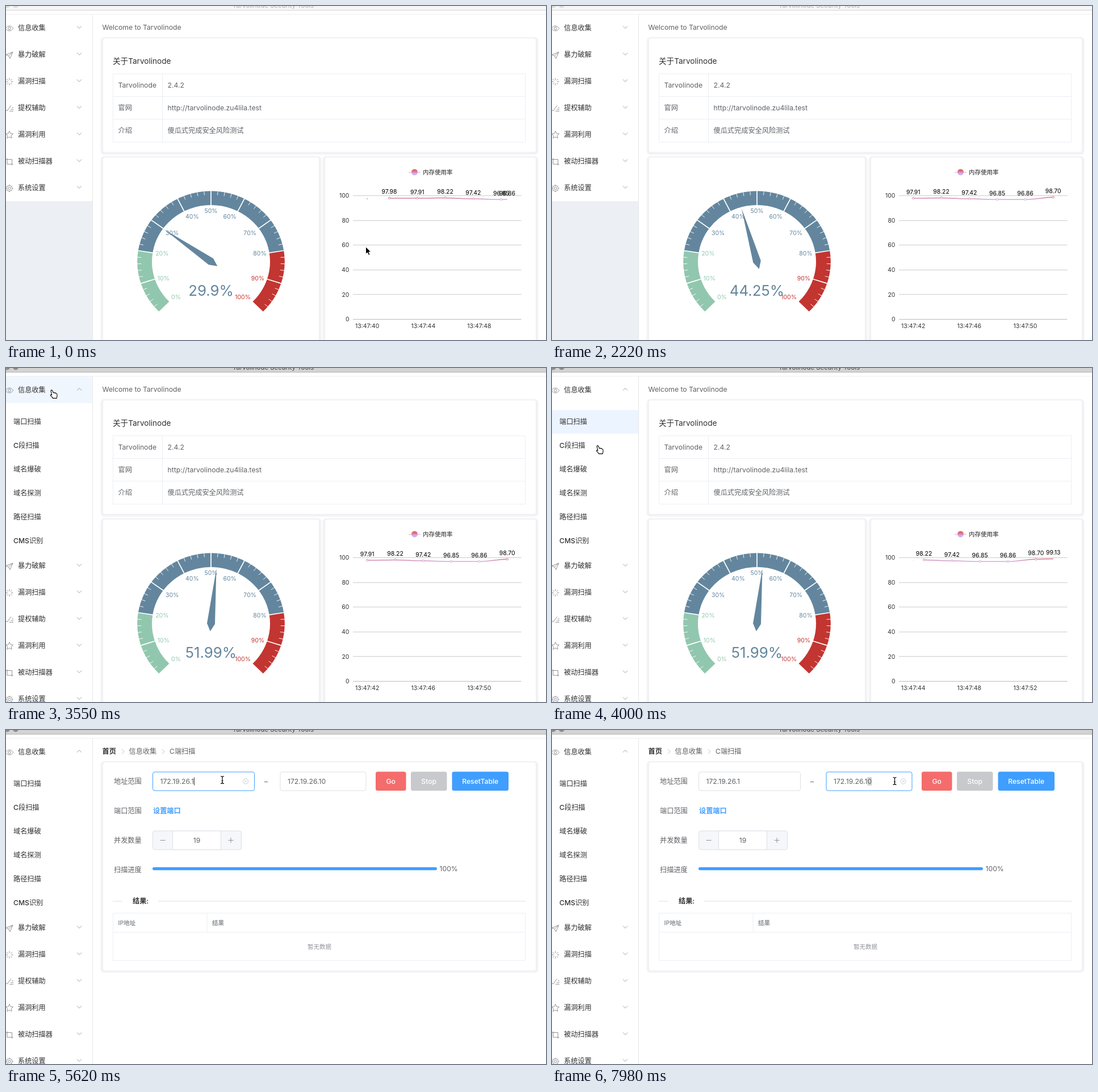
Animation, 951 px wide and 589 px high, one loop 8 s. Source, as an HTML page:

```html
<!DOCTYPE html>
<html lang="zh">
<head>
<meta charset="utf-8">
<style>
  html, body { margin: 0; width: 100%; height: 100%; overflow: hidden; background: #fff; }
  svg { display: block; width: 951px; height: 589px; }
  text { font-family: Inter, "Noto Sans CJK SC", "Noto Sans CJK", sans-serif; white-space: pre; }
</style>
</head>
<body>
<svg id="stage" viewBox="0 0 951 589" xmlns="http://www.w3.org/2000/svg"></svg>
<script>
const LOOP = 8000;
const BODY = 12.2, SMALL = 10.5;
const BLUE = '#63869e', GREEN = '#91c7ae', RED = '#c23531';
const INK = '#303133', GREY = '#606266', MUTED = '#909399', RULE = '#ebeef5';

const clamp = v => Math.max(0, Math.min(1, v));
const cubicOut = v => 1 - (1 - clamp(v)) ** 3;
const smooth = v => { v = clamp(v); return v * v * (3 - 2 * v); };
const mix = (a, b, p) => a + (b - a) * p;
const $ = id => document.getElementById(id);
const set = (id, attrs) => { for (const k in attrs) $(id).setAttribute(k, attrs[k]); };
const show = (id, on) => $(id).setAttribute('display', on ? 'inline' : 'none');

// Markup helpers; text is placed by its vertical centre.
const text = (x, cy, str, size = BODY, fill = GREY, extra = '') =>
  `<text x="${x}" y="${cy + size * .36}" font-size="${size}" fill="${fill}" ${extra}>${str}</text>`;
const rect = (x, y, w, h, fill, extra = '') =>
  `<rect x="${x}" y="${y}" width="${w}" height="${h}" fill="${fill}" ${extra}/>`;
const path = (d, stroke = RULE, w = 1, extra = '') =>
  `<path d="${d}" fill="none" stroke="${stroke}" stroke-width="${w}" ${extra}/>`;
const circle = (x, y, r, fill, extra = '') => `<circle cx="${x}" cy="${y}" r="${r}" fill="${fill}" ${extra}/>`;
const mid = 'text-anchor="middle"', end = 'text-anchor="end"', bold = 'font-weight="600"';

const shadow = (x, y, w, h) => rect(x - 3.5, y - 2, w + 7, h + 6, '#f3f3f3', 'rx="6"');
const card = (x, y, w, h) => rect(x, y, w, h, '#fff', `rx="3.5" stroke="${RULE}"`);

// ---------- sidebar ----------
const MENU = ['信息收集', '暴力破解', '漏洞扫描', '提权辅助', '漏洞利用', '被动扫描器', '系统设置'];
const SUBMENU = ['端口扫描', 'C段扫描', '域名爆破', '域名探测', '路径扫描', 'CMS识别'];
const ITEM = 47, SUB = 41.9, OPENED = 263;

const spokes = (n, r0, r1) => Array.from({ length: n }, (_, i) => {
  const a = i * 2 * Math.PI / n, c = Math.cos(a), s = Math.sin(a);
  return `M${c * r0} ${s * r0}L${c * r1} ${s * r1}`;
}).join('');
const star = 'M' + Array.from({ length: 10 }, (_, i) => {
  const a = i * Math.PI / 5 - Math.PI / 2, r = i % 2 ? 3.3 : 7;
  return `${r * Math.cos(a)} ${r * Math.sin(a)}`;
}).join('L') + 'Z';
const ring = r => `M${-r} 0a${r} ${r} 0 1 0 ${2 * r} 0a${r} ${r} 0 1 0 ${-2 * r} 0`;
const ICONS = [
  'M-7 0Q0-9 7 0Q0 9-7 0Z' + ring(2.3),
  'M6-5.5L-6-.5L-1.5 1.5L1 6ZL-1.5 1.5',
  spokes(8, 3, 6.5),
  'M-7 1.5L-4 4.5L3-5M0 4.8H7M2.5 1.8H7M4.5-1.2H7',
  star,
  'M-4-6V4.5H6.5M-7-4H4.5V6.5',
  ring(2.3) + ring(5) + spokes(8, 5, 6.7)
];

function menuItem(i) {
  const cy = 38.5 + i * ITEM;
  return rect(0, cy - 23.5, 151.5, ITEM, '#f0f6fe', `id="m${i}" opacity="0"`) +
    path(ICONS[i], MUTED, 1, `transform="translate(6 ${cy + 1})"`) +
    text(21, cy, MENU[i], BODY, INK, 'font-weight="500"') +
    path('M-4-2L0 2L4-2', MUTED, .9, `id="chev${i}" transform="translate(129 ${cy - 1})"`);
}

const sidebar = rect(0, 14, 152, 575, '#ecf0f5') +
  rect(0, 14, 152, 49, '#fff') + menuItem(0) +
  '<g id="submenu">' + rect(0, 62, 152, OPENED, '#fff') +
  SUBMENU.map((name, i) => {
    const cy = 95 + i * SUB;
    return rect(0, cy - 21, 152, SUB, '#ecf5ff', `id="s${i}" opacity="0"`) +
      text(13, cy, name, BODY, INK, 'font-weight="500"');
  }).join('') + '</g><g id="rest">' + rect(0, 62, 152, 282, '#fff') +
  MENU.map((_, i) => i ? menuItem(i) : '').join('') + '</g>' +
  path('M152.5 14V589', '#e6e6e6');

const HOVERS = [['m2', 2800, 2980], ['m0', 3000, 3750], ['s0', 3830, 4010], ['s1', 4020, 4450]];

// ---------- gauge ----------
const CX = 361, CY = 450.8, R = 129.8, FLAT = .959, BAND = 25.8;
const angleOf = v => (225 - v * 2.7) * Math.PI / 180;
const polar = (v, r) => {
  const a = angleOf(v);
  return [CX + r * Math.cos(a), CY - r * FLAT * Math.sin(a)];
};
const spoke = (v, r0, r1) => `M${polar(v, r0)}L${polar(v, r1)}`;

function band(from, to, fill) {
  const large = (to - from) * 2.7 > 180 ? 1 : 0, r = R - BAND;
  return `<path fill="${fill}" d="M${polar(from, R)}A${R} ${R * FLAT} 0 ${large} 1 ${polar(to, R)}` +
    `L${polar(to, r)}A${r} ${r * FLAT} 0 ${large} 0 ${polar(from, r)}Z"/>`;
}

function gaugeMarks() {
  let out = '';
  for (let v = 0; v <= 100; v += 2) {
    const major = v % 10 === 0;
    if (v > 0 && v < 100) out += path(spoke(v, R + .5, R - (major ? BAND + .5 : 7)), '#fff', major ? 1.75 : .9);
    if (!major) continue;
    const [x, y] = polar(v, 99), c = Math.cos(angleOf(v)), s = Math.sin(angleOf(v));
    const anchor = c < -.4 ? 'start' : c > .4 ? 'end' : 'middle';
    const dy = s > .4 ? 5 : s < -.4 ? -5 : 0;
    const fill = v <= 20 ? GREEN : v <= 80 ? BLUE : RED;
    out += text(x, y + dy, v + '%', SMALL, fill, `text-anchor="${anchor}"`);
  }
  return out;
}

const gauge = band(0, 20, GREEN) + band(20, 80, BLUE) + band(80, 100, RED) + gaugeMarks() +
  `<path id="needle" fill="${BLUE}"/>` + text(CX, 501.5, '', 25.8, BLUE, `id="reading" ${mid}`);

const READINGS = [[-2000, 29.9], [926, 44.25], [2926, 51.99]];

function drawGauge(t) {
  let k = 0;
  while (k < 2 && t >= READINGS[k + 1][0]) k++;
  const [start, value] = READINGS[k];
  const v = k ? mix(READINGS[k - 1][1], value, cubicOut((t - start) / 300)) : value;
  const a = angleOf(v), c = Math.cos(a), s = Math.sin(a), w = 7;
  const at = (along, side) => [CX + along * c + side * s, CY - FLAT * (along * s - side * c)];
  set('needle', { d: `M${at(-14, 0)}L${at(0, w)}L${at(101.5, 0)}L${at(0, -w)}Z` });
  $('reading').textContent = value + '%';
}

// ---------- memory chart ----------
const SERIES = [97.5, 97.98, 97.91, 98.22, 97.42, 96.85, 96.86, 98.70, 99.13];
const SHIFTS = [-22, 1960, 3919];
const slotX = i => 636.2 + i * 49.3;
const valueY = v => 552.5 - v * 2.18;

const chart = [0, 20, 40, 60, 80, 100].map(v =>
  path(`M611 ${Math.floor(valueY(v)) + .5}H907.5`, v ? '#ccc' : '#bbb') +
  text(604.5, valueY(v), v, SMALL, '#333', end)).join('') +
  [0, 1, 2].map(i => text(slotX(i * 2), 564, '', SMALL, '#333', `id="time${i}" ${mid}`)).join('') +
  path('M709 293.5H730', '#e7c6d6', 1.5) + circle(719.5, 293, 5.5, 'url(#legend)') +
  text(734, 293.5, '内存使用率', SMALL, '#222') +
  '<path id="line" fill="none" stroke="url(#trace)" stroke-width="1.5"/><g id="marks"></g>';

function drawChart(t) {
  let k = 0;
  while (k < 2 && t >= SHIFTS[k + 1]) k++;
  const p = cubicOut((t - SHIFTS[k]) / 300);
  const pts = SERIES.slice(k + 1, k + 7).map((v, i) =>
    ({ v, x: i < 5 ? mix(slotX(i + 1), slotX(i), p) : slotX(5), y: valueY(v) }));
  const ys = pts.map(q => q.y);
  set('trace', { y1: Math.min(...ys) - .5, y2: Math.max(...ys) + .5 });
  set('line', {
    d: pts.map((q, i) => {
      if (!i) return `M${q.x} ${q.y}`;
      const b = pts[i - 1], m = (q.x - b.x) * .35;
      return `C${b.x + m} ${b.y} ${q.x - m} ${q.y} ${q.x} ${q.y}`;
    }).join('')
  });
  const dot = (x, y, scale) => circle(x, y, 1.7 * scale, '#fff', 'stroke="url(#trace)" stroke-width="1"');
  const newest = clamp(p * 3 - 2);
  $('marks').innerHTML =
    (p < 1 ? circle(slotX(0), valueY(SERIES[k]), 1.7 * (1 - p), '#dcc8da') : '') +
    pts.map((q, i) => (i < 5 || newest > 0 ? dot(q.x, q.y, i < 5 ? 1 : newest) : '') +
      text(q.x, q.y - 11.2, q.v.toFixed(2), SMALL, '#000', mid)).join('');
  for (let i = 0; i < 3; i++) $('time' + i).textContent = '13:47:' + (40 + 2 * k + 4 * i);
}

// ---------- pages ----------
const dashboard = text(169.5, 38, 'Welcome to Tarvolinode') +
  shadow(170, 57, 764, 201) + shadow(170, 267, 382, 340) + shadow(561, 267, 373, 340) +
  card(170.5, 56.5, 763, 201.5) + card(170.5, 266.5, 381, 340) + card(561.5, 266.5, 372, 340) +
  text(188, 97, '关于Tarvolinode', 13.6, INK) +
  path('M188.5 119.5H914.5V240H188.5ZM188.5 159.5H914.5M188.5 199.5H914.5M275.5 119.5V240') +
  [['Tarvolinode', '2.4.2'], ['官网', 'http://tarvolinode.zu4lila.test'], ['介绍', '傻瓜式完成安全风险测试']]
    .map(([key, val], i) => text(197.5, 139.5 + 40 * i, key) + text(284.5, 139.5 + 40 * i, val)).join('') +
  gauge + chart;

const field = (id, x, w, value) =>
  rect(x, 74, w, 33, '#fff', `id="${id}" rx="3.5" stroke="#dcdfe6"`) +
  rect(0, 83, 8, 15, '#d4d4d4', `id="${id}Sel" display="none"`) +
  text(x + 13, 90.5, value, BODY, GREY, `id="${id}Text"`) +
  `<g id="${id}Clear">` + path(ring(4.6) + 'M-1.7-1.7L1.7 1.7M1.7-1.7L-1.7 1.7', '#c0c4cc', .9,
    `transform="translate(${x + w - 15.5} 90.5)"`) + '</g>';
const button = (x, w, label, fill) => rect(x, 73.5, w, 33.5, fill, 'rx="3.5"') +
  text(x + w / 2, 90.5, label, BODY, '#fff', `${mid} font-weight="500"`);
const crumb = x => path(`M${x - 2} 34L${x + 2} 38L${x - 2} 42`, '#c0c4cc');

const scan = text(169.5, 38, '首页', BODY, INK, 'font-weight="700"') + crumb(206) +
  text(216.5, 38, '信息收集') + crumb(277) + text(288, 38, 'C端扫描') +
  shadow(170, 57, 764, 367) + card(170.5, 56.5, 763, 368) +
  ['地址范围', '端口范围', '并发数量', '扫描进度'].map((s, i) => text(190, 90.5 + 52 * i, s)).join('') +
  field('from', 258.5, 179, '172.19.26.1') + text(458, 90.5, '–', BODY, GREY, mid) +
  field('to', 483, 151, '172.19.26.10') +
  path('M0 83.5V97.5', '#333', 1, 'id="caret"') +
  button(651, 53.5, 'Go', '#f56c6c') + button(713, 63.5, 'Stop', '#c8c9cc') +
  button(785.5, 99.5, 'ResetTable', '#409eff') +
  text(259, 142.5, '设置端口', BODY, '#409eff', bold) +
  rect(258.5, 178, 156, 33, '#f5f7fa', 'rx="3.5" stroke="#dcdfe6"') +
  rect(293.5, 178, 85, 33, '#fff', 'stroke="#dcdfe6"') +
  path('M271.5 194.5H280.5M391.5 194.5H400.5M396 190V199', MUTED) + text(336, 194.5, '19', BODY, GREY, mid) +
  rect(258, 242, 501, 5.2, '#409eff', 'rx="2.6"') + text(763.5, 244.5, '100%') +
  path('M188 302H205M268 302H915', '#dcdfe6') + text(223, 302, '结果:', BODY, INK, bold) +
  path('M188.5 323H914.5V406.5H188.5ZM188.5 356.5H914.5M354 323V356.5') +
  text(197.5, 340, 'IP地址', SMALL, MUTED, bold) + text(363, 340, '结果', SMALL, MUTED, bold) +
  text(552, 382, '暂无数据', SMALL, MUTED, mid);

const POINTERS =
  `<g id="arrow"><path d="M0 0V13L3 10.4L5.2 15L7.5 14L5.4 9.4H9.3Z" stroke="#fff" stroke-width="1"/></g>` +
  `<g id="hand"><path d="M-5-6Q-4-8-2.4-6.4L-.6-2.2Q1-3.4 2-1.8Q3.6-2.6 4.4-1Q6-1 6 1Q6.4 4 5 7.4H-1.4Q-2.6 5-5.6 2.4Q-6 .6-3.4 1.4Z"
    fill="#fff" stroke="#000" stroke-width="1.1"/></g>` +
  `<g id="beam">` + path('M-3-6.5Q0-6.5 0-4.5V4.5Q0 6.5-3 6.5M3-6.5Q0-6.5 0-4.5M0 4.5Q0 6.5 3 6.5M-1.5 1.5H1.5', '#000', 1.2) + '</g>';

$('stage').innerHTML = `<defs>
  <linearGradient id="legend" x2="0" y2="1"><stop offset=".3" stop-color="#e2686f"/><stop offset=".7" stop-color="#c9b0f6"/></linearGradient>
  <linearGradient id="trace" gradientUnits="userSpaceOnUse" x1="0" x2="0"><stop stop-color="#de6f80"/><stop offset="1" stop-color="#c8b6ee"/></linearGradient>
  </defs>` + rect(0, 0, 951, 589, '#fff') + sidebar +
  `<g id="dashboard">${dashboard}</g><g id="scan">${scan}</g>` +
  rect(0, 0, 951, 14, '#fff') + path('M0 14.5H951', '#eee') +
  rect(0, 0, 951, 7, '#f6f6f6', 'id="bar"') + path('M0 7.5H951', '#d0d0d0', 1, 'id="barEdge"') +
  circle(2, -1.5, 5, '#ddd', 'id="light0"') + circle(17, -1.5, 5, '#ddd', 'id="light1"') +
  text(470.5, -1, 'Tarvolinode Security Tools', 11.4, '#aaa', `id="title" ${mid}`) + POINTERS;

// ---------- pointer ----------
const TRACK = [
  [0, 633.5, 424.5], [2300, 633.5, 424.5], [2700, 200, 240], [2850, 92, 132], [2960, 84, 80],
  [3110, 84, 46], [3800, 84, 46], [4000, 84, 144], [4150, 84, 138], [4290, 120, 137],
  [4440, 212, 132], [4700, 300, 115], [5000, 370, 92], [5470, 381, 88], [5620, 381, 88],
  [5900, 378, 89], [6200, 378, 89], [6500, 241, 88], [6800, 380, 90], [7000, 380, 90],
  [7300, 490, 90], [7550, 562, 89], [7980, 603.5, 90]
];

function drawPointer(t) {
  let i = 0;
  while (i < TRACK.length - 2 && t >= TRACK[i + 1][0]) i++;
  const [t0, x0, y0] = TRACK[i], [t1, x1, y1] = TRACK[i + 1], p = smooth((t - t0) / (t1 - t0));
  const x = mix(x0, x1, p), y = mix(y0, y1, p);
  const visible = t < 450 || t >= 2300;
  const inField = t > 4300 && y > 74 && y < 107 && (x > 258 && x < 437 || x > 482 && x < 634);
  const kind = x < 152 ? 'hand' : inField ? 'beam' : 'arrow';
  for (const id of ['arrow', 'hand', 'beam']) {
    show(id, visible && id === kind);
    set(id, { transform: `translate(${x} ${y})` });
  }
}

// ---------- frame ----------
function drawSidebar(t) {
  const p = smooth((t - 3230) / 300);
  show('submenu', p > 0);
  set('rest', { transform: `translate(0 ${OPENED * p})` });
  set('chev0', { transform: `translate(129 37.5) rotate(${180 * p})` });
  for (const [id, on, off] of HOVERS)
    set(id, { opacity: t < off ? clamp((t - on) / 80) : 1 - clamp((t - off) / 150) });
}

function drawForm(t) {
  const inFrom = t >= 5250 && t < 7480, inTo = t >= 7480;
  set('from', { stroke: inFrom ? '#409eff' : '#dcdfe6' });
  set('to', { stroke: inTo ? '#409eff' : '#dcdfe6' });
  show('fromClear', inFrom);
  show('toClear', inTo);
  const value = $('toText');
  set('toSel', { x: 496 + value.getSubStringLength(0, 11), width: value.getSubStringLength(11, 1) });
  show('toSel', t >= 7700);
  set('caret', { transform: `translate(${272 + $('fromText').getComputedTextLength()} 0)` });
  show('caret', inFrom && (t < 5760 || t >= 6350 && t < 6800));
}

function draw(t) {
  const focused = t >= 2520, onScan = t >= 4100;
  set('bar', { fill: focused ? '#d3d3d3' : '#f6f6f6' });
  set('barEdge', { stroke: focused ? '#b4b4b4' : '#d6d6d6' });
  set('title', { fill: focused ? '#444' : '#b0b0b0' });
  for (const id of ['light0', 'light1']) set(id, { fill: focused ? '#8c8c8c' : '#dcdcdc' });
  show('dashboard', !onScan);
  show('scan', onScan);
  drawSidebar(t);
  if (onScan) {
    const p = cubicOut((t - 4100) / 500);
    set('scan', { opacity: p, transform: `translate(${30 * (1 - p)} 0)` });
    drawForm(t);
  } else {
    drawGauge(t);
    drawChart(t);
  }
  drawPointer(t);
}

const begin = performance.now();
function tick() {
  draw((performance.now() - begin) % LOOP);
  requestAnimationFrame(tick);
}
tick();
</script>
</body>
</html>
```
